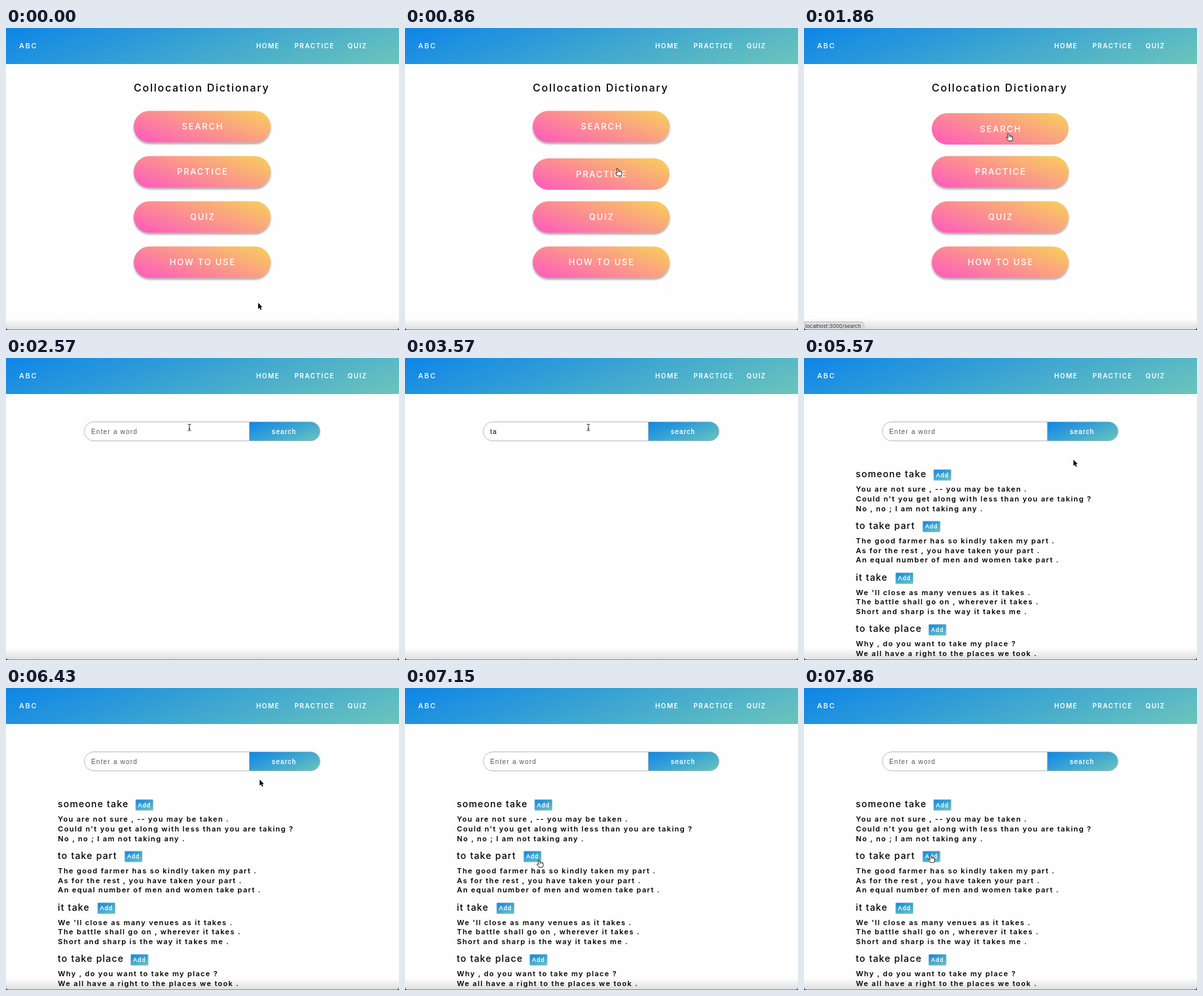
An HTML page for the animation above (8 s loop, 600 px wide and 461 px high).

```html
<!DOCTYPE html>
<html lang="en">
<head>
<meta charset="utf-8">
<title>Collocation Dictionary</title>
<style>
  html, body { margin: 0; width: 100%; height: 100%; overflow: hidden; background: #fefefe; }
  svg { display: block; width: 600px; height: 461px; }
  text { font-family: Inter, "Open Sans", sans-serif; font-weight: 500; white-space: pre; }
  .brand { font-size: 11px; letter-spacing: 1.8px; fill: #fff; }
  .nav { font-size: 10px; font-weight: 600; letter-spacing: 1.4px; fill: #fff; }
  .title { font-size: 16px; letter-spacing: 1.75px; }
  .menu { font-size: 13px; letter-spacing: 1.75px; fill: #fff; text-anchor: middle; }
  .head { font-size: 14px; letter-spacing: 1.2px; }
  .line { font-size: 11px; font-weight: 600; letter-spacing: 1.35px; }
  .field, .add { font-family: "Liberation Sans", Arial, sans-serif; font-weight: 400; }
  .field { font-size: 10px; letter-spacing: 1.2px; }
  .add { font-size: 9px; letter-spacing: 1.2px; }
  .light { fill: #fff; stroke: #fff; stroke-width: .3px; }
  .status { font-size: 8px; font-weight: 400; fill: #333; }
</style>
</head>
<body>
<svg id="stage" viewBox="0 0 600 461">
  <defs>
    <linearGradient id="fade" x1="0" y1="0" x2="0" y2="1">
      <stop offset="0" stop-color="#000" stop-opacity="0"/>
      <stop offset="1" stop-color="#000" stop-opacity=".13"/>
    </linearGradient>
    <filter id="shadow" x="-10%" y="-20%" width="120%" height="150%">
      <feDropShadow dx="0" dy="2.5" stdDeviation="1.6" flood-color="#000" flood-opacity=".36"/>
    </filter>
  </defs>
  <rect width="600" height="461" fill="#fefefe"/>
  <g id="header"></g>
  <g id="home"></g>
  <g id="search"></g>
  <g id="results"></g>
  <rect y="443" width="600" height="18" fill="url(#fade)"/>
  <g id="status">
    <path d="M0 448.5H87Q91.500 448.500 91.500 453V461H0Z" fill="#dcdcde" stroke="#b9b9bb" stroke-width=".8"/>
    <text class="status" x="2" y="458">localhost:3000/search</text>
  </g>
  <rect y="460" width="600" height="1" fill="#8c8c8c"/>
  <path d="M0 457Q.5 460.500 4 461H0ZM600 457Q599.500 460.500 596 461H600Z" fill="#333"/>
  <g id="cursor">
    <path id="arrow" d="M0 0V9.400L2.100 7.400L3.600 10.800L5.200 10.100L3.700 6.800H6.500Z"
      fill="#000" stroke="#fff" stroke-width=".9" paint-order="stroke"/>
    <g id="hand" fill="#fff" stroke="#111" stroke-width=".9" stroke-linejoin="round">
      <path d="M-1 .9Q0 -.4 1 .9L1.900 4.300Q2.900 3.500 3.700 4.300Q4.700 3.700 5.300 4.700Q6.500 4.300 6.800 5.500L7.100 8.300Q7 10 6 11.800H.6Q-.8 9.600 -2.500 7.900Q-3.200 6.700 -1.800 6.500L.1 7.600Z"/>
      <path d="M2 4.300L2.400 6.300M3.700 4.500L4 6.300M5.300 4.800L5.500 6.500" fill="none" stroke-width=".6"/>
    </g>
    <path id="beam" d="M-2.500 -5Q0 -5 0 -3.500Q0 -5 2.500 -5M0 -3.500V3.500M-2.500 5Q0 5 0 3.500Q0 5 2.500 5M-1.300 2H1.300"
      fill="none" stroke="#222" stroke-width="1"/>
  </g>
</svg>
<script>
const $ = id => document.getElementById(id);
const NS = "http://www.w3.org/2000/svg";
const BLUE = ["#0d85e8", "#6cc5bb"], WARM = ["#ff57c1", "#f8d258"];

function add(parent, tag, attrs, text) {
  const el = document.createElementNS(NS, tag);
  for (const k in attrs) el.setAttribute(k, attrs[k]);
  if (text) el.textContent = text;
  return parent.appendChild(el);
}
const label = (parent, cls, x, y, text) => add(parent, "text", { class: cls, x, y }, text);

// Angled gradient across a w by h box, with corners touching both end colours
function gradient(id, w, h, deg, colors) {
  const a = deg * Math.PI / 180, s = Math.sin(a), c = -Math.cos(a);
  const half = (Math.abs(w * s) + Math.abs(h * c)) / 2;
  const g = add(document.querySelector("defs"), "linearGradient", {
    id, gradientUnits: "userSpaceOnUse",
    x1: w / 2 - s * half, y1: h / 2 - c * half,
    x2: w / 2 + s * half, y2: h / 2 + c * half
  });
  colors.forEach((color, i) => add(g, "stop", { offset: i, "stop-color": color }));
}
gradient("headFill", 600, 55, 160, BLUE);
gradient("goFill", 108, 29, 160, BLUE);
gradient("addFill", 26.5, 16.5, 160, BLUE);
gradient("warmFill", 209, 48, 20, WARM);

// Header
add($("header"), "rect", { width: 600, height: 55, fill: "url(#headFill)" });
label($("header"), "brand", 20, 31, "ABC");
[["HOME", 382], ["PRACTICE", 440.5], ["QUIZ", 521.5]]
  .forEach(([s, x]) => label($("header"), "nav", x, 31, s));

// Home page
label($("home"), "title", 195, 96.5, "Collocation Dictionary");
const buttons = ["SEARCH", "PRACTICE", "QUIZ", "HOW TO USE"].map((s, i) => {
  const y = 126.5 + 69 * i, g = add($("home"), "g", {});
  const pill = add(g, "rect", { width: 209, height: 48, rx: 24, fill: "url(#warmFill)" });
  label(g, "menu", 105.3, 28.8, s);
  return { g, pill, x: 195, y, w: 209, h: 48 };
});

// Search page
add($("search"), "path", {
  d: "M371.500 97.500H134A14.500 14.500 0 0 0 134 126.500H371.500Z",
  fill: "#fff", stroke: "#b8babc", "stroke-width": 1
});
const field = label($("search"), "field", 130, 115.7, "");
const go = add($("search"), "g", { transform: "translate(371.5 97.5)" });
add(go, "path", {
  d: "M0 0H93.500A14.500 14.500 0 0 1 93.500 29H0Z",
  fill: "url(#goFill)", stroke: "#9fb8bd", "stroke-width": .8
});
label(go, "field light", 34.5, 18.2, "search");

// Results
const groups = [
  ["someone take", 198, "You are not sure , -- you may be taken .",
    "Could n't you get along with less than you are taking ?", "No , no ; I am not taking any ."],
  ["to take part", 181.3, "The good farmer has so kindly taken my part .",
    "As for the rest , you have taken your part .", "An equal number of men and women take part ."],
  ["it take", 140, "We 'll close as many venues as it takes .",
    "The battle shall go on , wherever it takes .", "Short and sharp is the way it takes me ."],
  ["to take place", 190.5, "Why , do you want to take my place ?",
    "We all have a right to the places we took ."]
];
const adds = groups.map(([head, x, ...lines], i) => {
  const y = 182 + 78.8 * i, top = y - 11.7;
  label($("results"), "head", 79, y, head);
  const b = add($("results"), "g", { transform: `translate(${x} ${top})` });
  add(b, "rect", { width: 26.5, height: 16.5, rx: 1, fill: "url(#addFill)", stroke: "#9cbcc4", "stroke-width": .8 });
  label(b, "add light", 3.6, 11.4, "Add");
  lines.forEach((s, n) => label($("results"), "line", 79.3, y + 22 + 14.8 * n, s));
  return { x, y: top, w: 26.5, h: 16.5 };
});

// Pointer path: time, x, y
const path = [
  [0, 385, 419.5], [150, 384, 414], [860, 324, 214], [1150, 322, 211], [1290, 321, 207],
  [1860, 311.5, 160.5], [2290, 311, 162], [2570, 280, 106], [3860, 280, 106],
  [4430, 425, 125.7], [4570, 424, 116], [4860, 423, 118], [5150, 416, 158], [5430, 414, 157],
  [6150, 387.3, 139.7], [6430, 387.3, 139.7], [7150, 204, 262], [7300, 204, 262], [7860, 192.5, 254.5], [8000, 192.5, 254.5]
];
function pointer(t) {
  const i = Math.max(1, path.findIndex(k => k[0] >= t));
  const [a, b] = [path[i - 1], path[i]];
  const p = (t - a[0]) / (b[0] - a[0]), e = p * p * (3 - 2 * p);
  return [a[1] + (b[1] - a[1]) * e, a[2] + (b[2] - a[2]) * e];
}

const inside = (r, x, y) => x >= r.x && x <= r.x + r.w && y >= r.y && y <= r.y + r.h;
const show = (id, on) => $(id).setAttribute("display", on ? "inline" : "none");
const INPUT = { x: 120, y: 98, w: 251, h: 28 }, GO = { x: 372, y: 98, w: 107, h: 27 };
const WORD = "take";

function draw(ms) {
  // Seven pictures a second, on a 10 ms clock
  const n = Math.floor(ms * .007 + .012), t = Math.round(n * 100 / 7) * 10;
  const home = n < 17, found = n >= 38;
  const [x, y] = pointer(t);

  show("home", home);
  show("search", !home);
  show("results", found);
  show("status", home && n >= 12);

  let over = false;
  for (const b of buttons) {
    const hit = home && inside(b, x, y);
    over = over || hit;
    b.g.setAttribute("transform", `translate(${b.x} ${b.y + (hit ? 3.5 : 0)})`);
    b.pill.setAttribute("filter", hit ? "none" : "url(#shadow)");
  }

  const typed = found ? "" : WORD.slice(0, Math.max(0, n - 23));
  field.textContent = typed || "Enter a word";
  field.setAttribute("fill", typed ? "#000" : "#555");

  const hand = over || !home && inside(GO, x, y) || found && adds.some(r => inside(r, x, y));
  const beam = !home && inside(INPUT, x, y);
  show("hand", hand);
  show("beam", beam);
  show("arrow", !hand && !beam);
  $("cursor").setAttribute("transform", `translate(${x} ${y})`);
}

const start = performance.now();
function tick() {
  draw((performance.now() - start) % 8000);
  requestAnimationFrame(tick);
}
tick();
</script>
</body>
</html>
```
